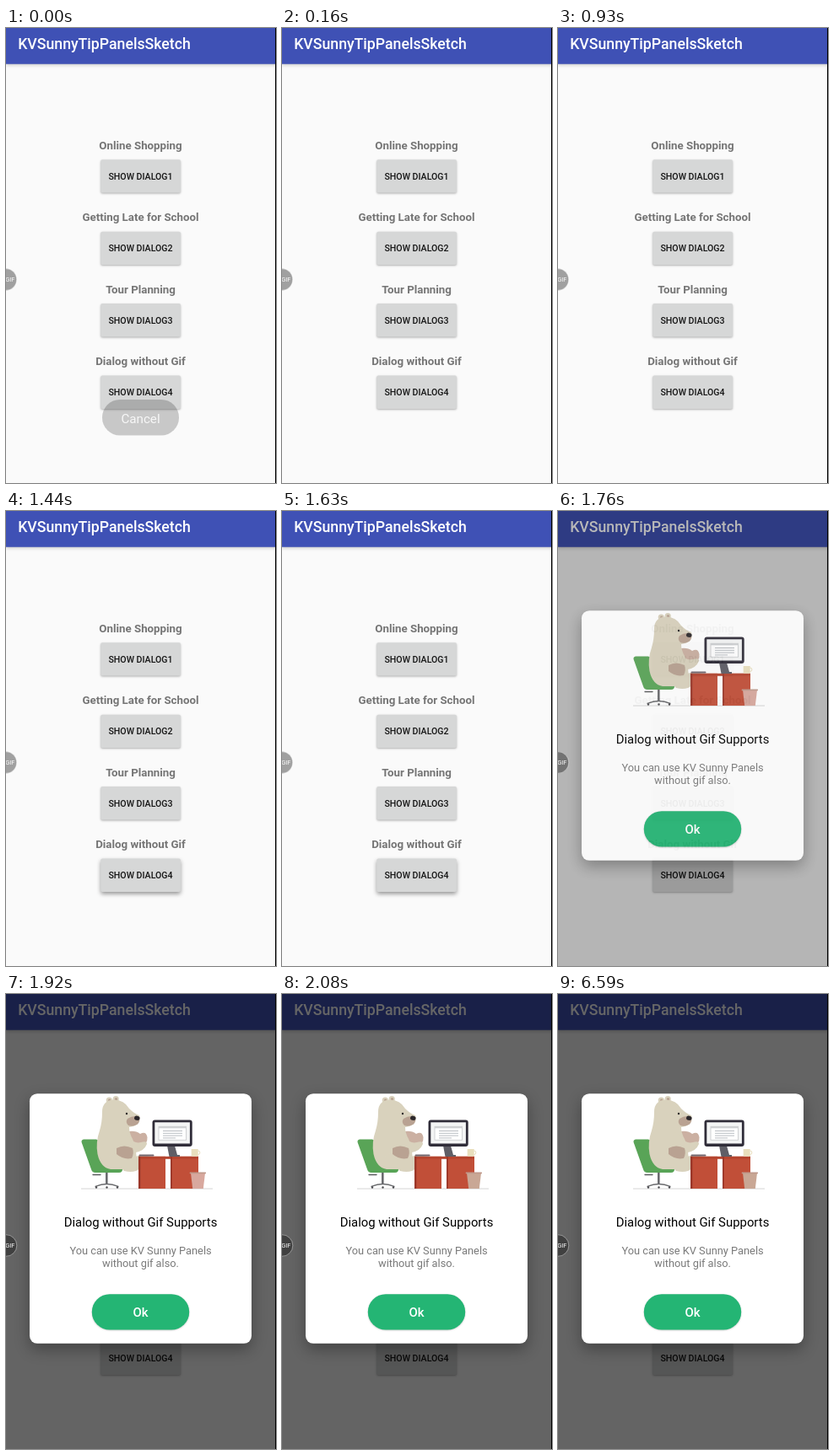
Recreate the animation shown at these times as an HTML page with a canvas. Size 320 by 540 pixels, loop 9.6 s.

```html
<!DOCTYPE html>
<html lang="en">
<head>
<meta charset="utf-8">
<title>Dialog demo</title>
<style>
html, body { margin: 0; width: 100%; height: 100%; overflow: hidden; background: #fafafa; }
canvas { display: block; width: 320px; height: 540px; }
</style>
</head>
<body>
<canvas id="stage"></canvas>
<script>
const W = 320, H = 540, LOOP = 9600;
const TOAST_END = 160, PRESS = 1440, FADE = 1760, OPEN = 1920, SETTLE = 2080;
const dpr = window.devicePixelRatio || 1;
const FONT = 'Roboto, "Noto Sans", sans-serif';

function prepare(canvas) {
  canvas.width = W * dpr;
  canvas.height = H * dpr;
  const c = canvas.getContext('2d');
  c.scale(dpr, dpr);
  return c;
}
const stage = document.getElementById('stage');
const layer = document.createElement('canvas');
const main = prepare(stage);
const card = prepare(layer);

function text(c, str, x, y, size, weight, color, align = 'center') {
  c.font = `${weight} ${size}px ${FONT}`;
  c.textAlign = align;
  c.fillStyle = color;
  c.fillText(str, x, y);
}

function box(c, x, y, w, h, r, color) {
  c.beginPath();
  c.roundRect(x, y, w, h, r);
  c.fillStyle = color;
  c.fill();
}

function rect(c, x, y, w, h, color) {
  c.fillStyle = color;
  c.fillRect(x, y, w, h);
}

function oval(c, x, y, rx, ry, color, turn = 0) {
  c.beginPath();
  c.ellipse(x, y, rx, ry, turn, 0, Math.PI * 2);
  c.fillStyle = color;
  c.fill();
}

function shape(c, d, color) {
  c.fillStyle = color;
  c.fill(new Path2D(d));
}

function line(c, d, color, width) {
  c.strokeStyle = color;
  c.lineWidth = width;
  c.lineCap = 'round';
  c.stroke(new Path2D(d));
}

function withShadow(c, dy, blur, alpha, draw) {
  c.save();
  c.shadowColor = `rgba(0,0,0,${alpha})`;
  c.shadowBlur = blur * dpr;
  c.shadowOffsetY = dy * dpr;
  draw();
  c.restore();
}

function drawScreen(c, raised) {
  rect(c, 0, 0, W, H, '#fafafa');
  withShadow(c, 1, 4, 0.22, () => box(c, 0, 0, W, 42.7, 0, '#3f51b5'));
  text(c, 'KVSunnyTipPanelsSketch', 14.2, 25.3, 17.7, 500, '#fff', 'left');

  const labels = ['Online Shopping', 'Getting Late for School', 'Tour Planning', 'Dialog without Gif'];
  labels.forEach((label, i) => {
    const y = i * 85.45;
    const up = raised && i === 3;
    text(c, label, 159.5, 144 + y, 13.3, 700, '#757575');
    withShadow(c, up ? 2.5 : 1, up ? 5 : 2.5, up ? 0.4 : 0.3,
      () => box(c, 112.3, 156.2 + y, 94.6, 39.4, 1.8, '#d6d7d7'));
    text(c, 'SHOW DIALOG' + (i + 1), 159.5, 180 + y, 10.6, 500, '#141414');
  });
}

function drawToast(c) {
  box(c, 114, 441, 91, 42.5, 21, 'rgba(0,0,0,0.2)');
  text(c, 'Cancel', 159.5, 468.7, 15.2, 400, 'rgba(255,255,255,0.85)');
}

function drawBubble(c) {
  oval(c, 0, 298.5, 12.6, 13, 'rgba(0,0,0,0.36)');
  c.beginPath();
  c.arc(0, 298.5, 12.8, 0, Math.PI * 2);
  c.strokeStyle = 'rgba(255,255,255,0.5)';
  c.lineWidth = 0.8;
  c.stroke();
  text(c, 'GIF', 4.7, 301.1, 7.4, 400, '#fff');
}

function drawChair(c) {
  line(c, 'M103 214.5H112', '#5a5a5e', 1.3);
  rect(c, 118, 212, 2.6, 14, '#6a6b6e');
  line(c, 'M106 228.3Q113 225.5 119.5 225.5Q126 225.5 133 228.3', '#6a6b6e', 1.3);
  for (const x of [107, 119.5, 132]) oval(c, x, 229.5, 1.2, 1.2, '#4a4a4e');
  shape(c, 'M92 172.5H107Q110 173 111 176L121 203H134Q138 204 138 208Q138 212 134 212H106Q102 212 101 208L89.6 176Q89 173 92 172.5Z', '#59a457');
}

function drawBear(c) {
  const fur = '#d9d2bd', shade = '#b9a292', pink = '#cbb0a2';
  for (const [x, y] of [[122.3, 126], [130.2, 124.7]]) {
    oval(c, x, y, 3.6, 3.6, fur);
    oval(c, x + 0.3, y, 1.6, 1.6, shade);
  }
  // far arm
  shape(c, 'M146 163Q154 162 159 166Q166 162 167.5 170Q168 178 160 181Q152 183 147 179Z', pink);
  // body and head
  shape(c, 'M114 140Q114 126 128 125.5Q140 125.5 146 136Q152 142 158 144Q160 151 155 155Q150 158 146 158Q146 165 150 172Q156 186 154 199Q152 208 136 208H124Q112 206 108.5 190Q106 176 111 162Q114 152 114 140Z', fur);
  shape(c, 'M144 148Q150 144 157 145.5Q160 150 156 154.5Q150 158 145 156Q141 152 144 148Z', shade);
  oval(c, 155.3, 147.3, 3.3, 2.6, '#2c282b', 0.2);
  oval(c, 143, 142, 1.2, 1.3, '#2c282b');
  // near arm, leg and paw
  shape(c, 'M136 165Q142 163 147 171Q152 178 160 176Q167 174 167 178Q164 186 154 188Q143 188 137 178Z', fur);
  shape(c, 'M122 193Q130 186 142 190Q152 195 160 191L174 193Q177 196 172 200L154 210Q148 212 140 210Z', fur);
  shape(c, 'M131 183Q140 178 150 183Q152 189 149 195Q139 197 131 190Z', shade);
}

function drawDesk(c) {
  rect(c, 157, 192.8, 32, 38.2, '#c14f38');
  rect(c, 195, 192.8, 33, 38.2, '#c14f38');
  rect(c, 157, 192.8, 71, 3, '#b5452f');
  rect(c, 157, 192.8, 2.4, 38.2, '#9b3729');
  rect(c, 195, 192.8, 1.8, 38.2, '#9b3729');
  // keyboard, stand, monitor
  box(c, 157.5, 190.5, 18, 2, 1, '#71646c');
  shape(c, 'M191 180H200L203 191H206V193H193.5Z', '#5f5e66');
  box(c, 173.5, 149.6, 47.2, 31.4, 3, '#302d39');
  rect(c, 176.3, 152.3, 41.6, 25.2, '#f4f5f5');
  rect(c, 180.5, 156.8, 33.5, 17, '#cfd1d3');
  rect(c, 181.5, 159.3, 31.5, 13.6, '#fff');
  for (let i = 0; i < 4; i++) {
    rect(c, 186, 162 + i * 2.8, i === 3 ? 15 : 23, 1, '#b9bdc2');
  }
  // mug
  box(c, 219.7, 184, 8, 8.8, [0, 0, 1.5, 1.5], '#e9dfbd');
  line(c, 'M228 186Q230.3 186 229.8 189Q229 191 228 190.5', '#e9dfbd', 1);
}

function drawBin(c, color) {
  shape(c, 'M219 212.5H236L233.8 231H221.2Z', color);
  box(c, 217.7, 211.5, 19.3, 1.8, 0.6, '#c09a8c');
}

function drawCard(c, binColor) {
  c.clearRect(0, 0, W, H);
  withShadow(c, 7, 18, 0.32, () => box(c, 28, 118.2, 263, 296.6, 9, '#fff'));
  rect(c, 89, 230.5, 156, 1.2, '#dcdcdc');
  drawChair(c);
  drawBear(c);
  drawDesk(c);
  drawBin(c, binColor);
  text(c, 'Dialog without Gif Supports', 159.5, 276, 14.9, 400, '#000');
  text(c, 'You can use KV Sunny Panels', 159.5, 308.8, 12.8, 400, '#7a7a7a');
  text(c, 'without gif also.', 159.5, 324, 12.8, 400, '#7a7a7a');
  withShadow(c, 0.7, 2, 0.22, () => box(c, 101.8, 356.2, 115.4, 42.3, 21.1, '#24b574'));
  text(c, 'Ok', 159.5, 383, 14.9, 500, '#fff');
}

function render(t) {
  const c = main;
  drawScreen(c, t >= PRESS && t < FADE);
  if (t < TOAST_END) drawToast(c);
  if (t >= FADE) {
    const fading = t < OPEN;
    rect(c, 0, 0, W, H, `rgba(0,0,0,${fading ? 0.28 : 0.6})`);
    drawCard(card, t < SETTLE ? '#d8a89e' : '#c9a795');
    c.globalAlpha = fading ? 0.92 : 1;
    c.drawImage(layer, 0, 0, W, H);
    c.globalAlpha = 1;
  }
  drawBubble(c);
  rect(c, 319, 0, 1, H, '#000');
}

const start = performance.now();
function tick() {
  render((performance.now() - start) % LOOP);
  requestAnimationFrame(tick);
}
tick();
</script>
</body>
</html>
```
